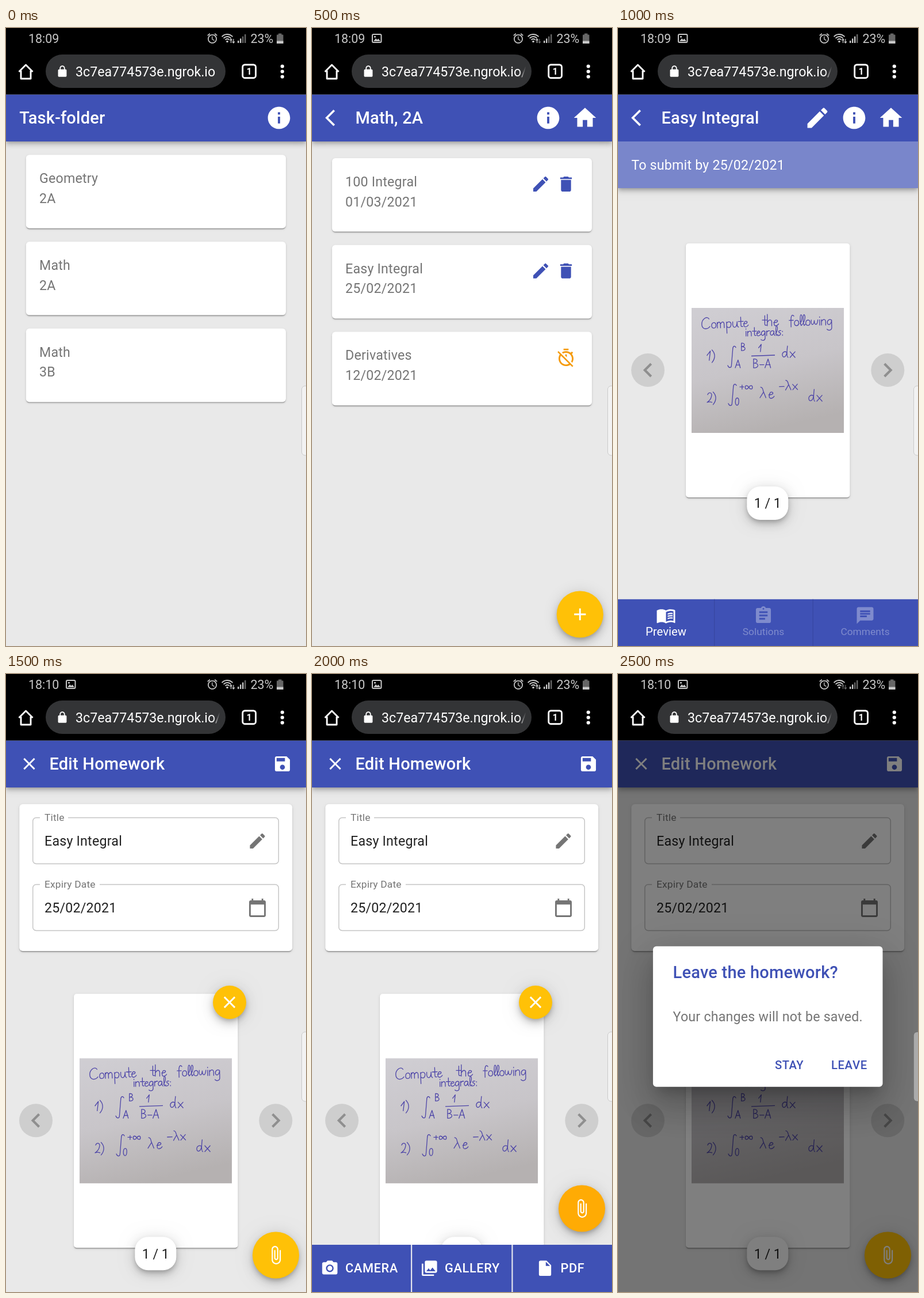
Animation of 522 by 1073 pixels, one loop 3 s. Source, as an HTML page with a canvas:

```html
<!DOCTYPE html>
<html lang="en">
<head>
<meta charset="utf-8">
<title>Homework app</title>
<style>
html, body { margin: 0; width: 100%; height: 100%; overflow: hidden; background: #e9e9e9; }
canvas { display: block; }
</style>
</head>
<body>
<canvas id="stage" width="522" height="1073"></canvas>
<script>
const ctx = document.getElementById('stage').getContext('2d');
const U = 1.45; // stage pixels per layout pixel
const BLUE = '#3f51b5', AMBER = '#ffc107', GREY = '#757575', DARK = '#212121', WHITE = '#fff';

const icons = {
  info: 'M12 2C6.48 2 2 6.48 2 12s4.48 10 10 10 10-4.48 10-10S17.52 2 12 2zm1 15h-2v-6h2v6zm0-8h-2V7h2v2z',
  home: 'M10 20v-6h4v6h5v-8h3L12 3 2 12h3v8z',
  back: 'M11.67 3.87L9.9 2.1 0 12l9.9 9.9 1.77-1.77L3.54 12z',
  prev: 'M15.41 7.41L14 6l-6 6 6 6 1.41-1.41L10.83 12z',
  next: 'M10 6L8.59 7.41 13.17 12l-4.58 4.59L10 18l6-6z',
  edit: 'M3 17.25V21h3.75L17.81 9.94l-3.75-3.75L3 17.25zM20.71 7.04c.39-.39.39-1.02 0-1.41l-2.34-2.34c-.39-.39-1.02-.39-1.41 0l-1.83 1.83 3.75 3.75 1.83-1.83z',
  trash: 'M6 19c0 1.1.9 2 2 2h8c1.1 0 2-.9 2-2V7H6v12zM19 4h-3.5l-1-1h-5l-1 1H5v2h14V4z',
  timerOff: 'M19.04 4.55l-1.42 1.42C16.07 4.74 14.12 4 12 4c-1.83 0-3.53.55-4.95 1.48l1.46 1.46C9.53 6.35 10.73 6 12 6c3.87 0 7 3.13 7 7 0 1.27-.35 2.47-.94 3.49l1.45 1.45C20.45 16.53 21 14.83 21 13c0-2.12-.74-4.07-1.97-5.61l1.42-1.42-1.41-1.42zM15 1H9v2h6V1zm-4 8.44l2 2V8h-2v1.44zM3.02 4L1.75 5.27 4.5 8.03C3.55 9.45 3 11.16 3 13c0 4.97 4.02 9 9 9 1.84 0 3.55-.55 4.98-1.5l2.5 2.5 1.27-1.27-7.71-7.71L3.02 4zM12 20c-3.87 0-7-3.13-7-7 0-1.28.35-2.48.95-3.52l9.56 9.56c-1.03.61-2.23.96-3.51.96z',
  plus: 'M19 13h-6v6h-2v-6H5v-2h6V5h2v6h6v2z',
  close: 'M19 6.41L17.59 5 12 10.59 6.41 5 5 6.41 10.59 12 5 17.59 6.41 19 12 13.41 17.59 19 19 17.59 13.41 12z',
  save: 'M17 3H5c-1.11 0-2 .9-2 2v14c0 1.1.89 2 2 2h14c1.1 0 2-.9 2-2V7l-4-4zm-5 16c-1.66 0-3-1.34-3-3s1.34-3 3-3 3 1.34 3 3-1.34 3-3 3zm3-10H5V5h10v4z',
  date: 'M20 3h-1V1h-2v2H7V1H5v2H4c-1.1 0-2 .9-2 2v16c0 1.1.9 2 2 2h16c1.1 0 2-.9 2-2V5c0-1.1-.9-2-2-2zm0 18H4V8h16v13z',
  clip: 'M16.5 6v11.5c0 2.21-1.79 4-4 4s-4-1.79-4-4V5c0-1.38 1.12-2.5 2.5-2.5s2.5 1.12 2.5 2.5v10.5c0 .55-.45 1-1 1s-1-.45-1-1V6H10v9.5c0 1.38 1.12 2.5 2.5 2.5s2.5-1.12 2.5-2.5V5c0-2.21-1.79-4-4-4S7 2.79 7 5v12.5c0 3.04 2.46 5.5 5.5 5.5s5.5-2.46 5.5-5.5V6h-1.5z',
  book: 'M21 5c-1.11-.35-2.33-.5-3.5-.5-1.95 0-4.05.4-5.5 1.5-1.45-1.1-3.55-1.5-5.5-1.5S2.45 4.9 1 6v14.65c0 .25.25.5.5.5.1 0 .15-.05.25-.05C3.1 20.45 5.05 20 6.5 20c1.95 0 4.05.4 5.5 1.5 1.35-.85 3.8-1.5 5.5-1.5 1.65 0 3.35.3 4.75 1.05.1.05.15.05.25.05.25 0 .5-.25.5-.5V6c-.6-.45-1.25-.75-2-1zm0 13.5c-1.1-.35-2.3-.5-3.5-.5-1.7 0-4.15.65-5.5 1.5V8c1.35-.85 3.8-1.5 5.5-1.5 1.2 0 2.4.15 3.5.5v11.5zM14 9.5q3-1 6-.6v1.5q-3-.5-6 .7zM14 12.2q3-1 6-.6v1.5q-3-.5-6 .7zM14 14.9q3-1 6-.6v1.5q-3-.5-6 .7z',
  tasks: 'M19 3h-4.18C14.4 1.84 13.3 1 12 1c-1.3 0-2.4.84-2.82 2H5c-1.1 0-2 .9-2 2v14c0 1.1.9 2 2 2h14c1.1 0 2-.9 2-2V5c0-1.1-.9-2-2-2zm-7 0c.55 0 1 .45 1 1s-.45 1-1 1-1-.45-1-1 .45-1 1-1zm2 14H7v-2h7v2zm3-4H7v-2h10v2zm0-4H7V7h10v2z',
  chat: 'M20 2H4c-1.1 0-1.99.9-1.99 2L2 22l4-4h14c1.1 0 2-.9 2-2V4c0-1.1-.9-2-2-2zM6 9h12v2H6V9zm8 5H6v-2h8v2zm4-6H6V6h12v2z',
  camera: 'M12 8.8a3.2 3.2 0 1 0 0 6.4 3.2 3.2 0 1 0 0-6.4zM9 2L7.17 4H4c-1.1 0-2 .9-2 2v12c0 1.1.9 2 2 2h16c1.1 0 2-.9 2-2V6c0-1.1-.9-2-2-2h-3.17L15 2H9zm3 15c-2.76 0-5-2.24-5-5s2.24-5 5-5 5 2.24 5 5-2.24 5-5 5z',
  gallery: 'M22 16V4c0-1.1-.9-2-2-2H8c-1.1 0-2 .9-2 2v12c0 1.1.9 2 2 2h12c1.1 0 2-.9 2-2zm-11-4l2.03 2.71L16 11l4 5H8l3-4zM2 6v14c0 1.1.9 2 2 2h14v-2H4V6H2z',
  file: 'M6 2c-1.1 0-1.99.9-1.99 2L4 20c0 1.1.89 2 1.99 2H18c1.1 0 2-.9 2-2V8l-6-6H6zm7 7V3.5L18.5 9H13z',
  alarm: 'M22 5.72l-4.6-3.86-1.29 1.53 4.6 3.86L22 5.72zM7.88 3.39L6.6 1.86 2 5.71l1.29 1.53 4.59-3.85zM12.5 8H11v6l4.75 2.85.75-1.23-4-2.37V8zM12 4c-4.97 0-9 4.03-9 9s4.02 9 9 9c4.97 0 9-4.03 9-9s-4.03-9-9-9zm0 16c-3.87 0-7-3.13-7-7s3.13-7 7-7 7 3.13 7 7-3.13 7-7 7z',
  lock: 'M18 8h-1V6c0-2.76-2.24-5-5-5S7 3.24 7 6v2H6c-1.1 0-2 .9-2 2v10c0 1.1.9 2 2 2h12c1.1 0 2-.9 2-2V10c0-1.1-.9-2-2-2zM15.1 8H8.9V6c0-1.71 1.39-3.1 3.1-3.1 1.71 0 3.1 1.39 3.1 3.1v2z'
};

// Pen strokes: advance, then path on a baseline at y = 0
const pen = {
  C: [16, 'M13-15C10-21 1-15 1-7S9 3 14-3'], o: [9, 'M5-9C0-9-1 0 4 0S9-8 5-9'],
  m: [15, 'M1-9V0M1-6C3-11 6-10 6-5V0M6-6C9-11 12-10 12-5V0'], p: [10, 'M1-9V9M1-7C4-11 9-9 8-4S3 1 1-2'],
  u: [10, 'M1-9C0-2 2 0 4 0S8-4 8-9V-2L10 0'], t: [7, 'M4-16V-3Q4 0 7-1M0-9H8'],
  e: [9, 'M1-5C9-5 8-9 5-9S0 0 4 0Q7 0 9-3'], h: [10, 'M1-18V0M1-5C4-11 8-10 8-5V0'],
  f: [8, 'M8-16C5-20 3-16 3-10V2M0-9H7'], l: [5, 'M1-3C6-10 5-18 3-18S1-3 3 0L5-2'],
  w: [13, 'M1-9C0 1 5 1 6-8C6 1 11 1 12-9'], i: [4, 'M2-9V0M2-14v1'],
  n: [10, 'M1-9V0M1-6C4-11 8-10 8-5V0'], g: [10, 'M8-8C4-11 0-7 1-3S7 0 8-8V4C8 9 3 10 0 7'],
  r: [7, 'M1-9V0M1-6Q3-10 7-9'], a: [10, 'M8-8C4-11 0-7 1-3S7 0 8-8Q7-1 10 0'],
  s: [7, 'M6-9C1-10 1-6 4-5S5 1 0 0'], ':': [4, 'M2-8v1M2-1v1'],
  1: [9, 'M1-9L7-17L5 0'], 2: [10, 'M1-14C3-20 10-18 8-11C7-6 3-2 0 0Q5-2 9 0'],
  0: [10, 'M5-17C-1-17-1 0 4 0S10-16 5-17'], ')': [8, 'M1-19C8-12 7-3 1 4'],
  A: [13, 'M0 0L6-17L11 0M2-6H10'], B: [13, 'M1-17V0M1-17C10-18 10-10 2-9C13-9 11 1 1 0'],
  d: [12, 'M8-8C4-11 0-7 1-3S7 0 8-8M9-18Q7-1 10 0'], x: [11, 'M1-9L9 0M9-9L1 0'],
  'λ': [11, 'M1-16Q4-16 5-10L9 0M5-8L0 0'], '∞': [18, 'M9-4C6-9 1-9 1-4S6 1 9-4S17-9 17-4S12 1 9-4'],
  '+': [11, 'M0-5H9M5-9V0'], '-': [10, 'M0-6H8'], '∫': [14, 'M13-17C11-21 8-19 8-14L6 11C6 16 2 17 0 12']
};

// Shadow layers: offset, blur, spread, opacity
const low = [[2, 1, -1, .2], [1, 1, 0, .14], [1, 3, 0, .12]];
const bar = [[2, 4, -1, .2], [4, 5, 0, .14], [1, 10, 0, .12]];
const float = [[3, 5, -1, .2], [6, 10, 0, .14], [1, 18, 0, .12]];
const high = [[11, 15, -7, .2], [24, 38, 3, .14], [9, 46, 8, .12]];

function rect(x, y, w, h, color) {
  ctx.fillStyle = color;
  ctx.fillRect(x, y, w, h);
}

function round(x, y, w, h, r) {
  ctx.beginPath();
  ctx.roundRect(x, y, w, h, r);
}

function box(x, y, w, h, r, color, layers = []) {
  for (const [dy, blur, spread, alpha] of layers) {
    const s = spread * U;
    ctx.save();
    ctx.shadowColor = `rgba(0,0,0,${alpha})`;
    ctx.shadowBlur = blur * U;
    ctx.shadowOffsetX = 2000;
    ctx.shadowOffsetY = dy * U;
    ctx.fillStyle = '#000';
    round(x - s - 2000, y - s, w + 2 * s, h + 2 * s, Math.max(0, r + s));
    ctx.fill();
    ctx.restore();
  }
  ctx.fillStyle = color;
  round(x, y, w, h, r);
  ctx.fill();
}

function disc(x, y, r, color, layers) {
  box(x - r, y - r, 2 * r, 2 * r, r, color, layers);
}

function icon(name, x, y, color, scale = U) {
  ctx.save();
  ctx.translate(x - 12 * scale, y - 12 * scale);
  ctx.scale(scale, scale);
  ctx.fillStyle = color;
  ctx.fill(new Path2D(icons[name]));
  ctx.restore();
}

// y is the middle of the capital letters
function text(s, x, y, color, size = 16, { weight = 400, space = .0094, align = 'left' } = {}) {
  const px = size * U;
  ctx.font = `${weight} ${px}px Roboto, sans-serif`;
  ctx.letterSpacing = space * px + 'px';
  ctx.textAlign = align;
  ctx.fillStyle = color;
  ctx.fillText(s, x, y + px * .3555);
}

function line(path, color, width) {
  ctx.strokeStyle = color;
  ctx.lineWidth = width;
  ctx.stroke(new Path2D(path));
}

function write(s, x, y, scale, tilt = 0) {
  ctx.save();
  ctx.translate(x, y);
  ctx.rotate(tilt);
  ctx.scale(scale, scale);
  ctx.lineCap = ctx.lineJoin = 'round';
  for (const c of s) {
    line(pen[c][1], '#4d45a8', 1.3 / scale);
    ctx.translate(pen[c][0], 0);
  }
  ctx.restore();
}

function phoneBar(n) {
  const tint = '#c8c8c8', dim = '#666';
  rect(0, 0, 522, 115.5, '#000');
  text(n < 3 ? '18:09' : '18:10', 39, 18.5, tint, 14.8, { space: 0 });
  if (n) {
    ctx.strokeStyle = tint;
    ctx.lineWidth = 2;
    round(105, 11, 15.5, 14, 2);
    ctx.stroke();
    ctx.fillStyle = tint;
    ctx.fill(new Path2D('M107 23l4-5 2.5 2.5 2-2 3.5 4.5zM108 14h3v2.5h-3z'));
  }
  icon('alarm', 359, 18, tint, .88);
  for (const r of [4.5, 8.5, 12.5]) {
    ctx.beginPath();
    ctx.arc(385, 23.5, r, -Math.PI * .77, -Math.PI * .23);
    ctx.strokeStyle = tint;
    ctx.lineWidth = 1.9;
    ctx.stroke();
  }
  disc(385, 23.5, 1.8, tint);
  line('M391.5 26v-7m-2 2.5l2-2.5 2 2.5', n === 5 ? dim : tint, 1.3);
  line('M395.8 19v7m-2-2.5l2 2.5 2-2.5', n === 1 || n === 5 ? dim : tint, 1.3);
  const strong = n > 1 && n < 5 ? 3 : 2;
  for (let i = 0; i < 4; i++) {
    const h = 4 + i * 3.7;
    rect(403 + i * 4, 26 - h, 2.4, h, i < strong ? tint : dim);
  }
  text('23%', 425.5, 18.5, tint, 14.8, { space: 0 });
  rect(474, 9.5, 5.5, 3, dim);
  box(471, 11.5, 11.5, 15.5, 1, dim);
  rect(471, 22.5, 11.5, 4.5, tint);

  ctx.lineJoin = 'round';
  line('M22.5 76L34.5 64L46.5 76M26 74V88H43V74', WHITE, 2.9);
  ctx.lineJoin = 'miter';
  box(69, 46, 313, 58, 29, '#333436');
  icon('lock', 98, 75.5, WHITE, .93);
  text('3c7ea774573e.ngrok.io' + (n ? '/' : ''), 121, 76, WHITE, 16, { space: 0 });
  if (n) {
    const fade = ctx.createLinearGradient(360, 0, 372, 0);
    fade.addColorStop(0, '#33343600');
    fade.addColorStop(1, '#333436');
    rect(360, 60, 14, 32, fade);
  }
  ctx.strokeStyle = WHITE;
  ctx.lineWidth = 2.9;
  round(411.7, 63.7, 22.8, 23, 4);
  ctx.stroke();
  text('1', 423, 75.3, WHITE, 11, { weight: 700, space: 0, align: 'center' });
  for (const y of [66.5, 75.5, 84.5]) disc(480.8, y, 3.1, WHITE);
}

function appBar(title, x, lead, tail) {
  box(0, 115.5, 522, 81.5, 0, BLUE, bar);
  if (lead === 'back') icon('back', 40.4, 156, WHITE);
  if (lead === 'close') icon('close', 40.4, 156, WHITE);
  text(title, x, 156, WHITE, 20, { weight: 500, space: .0075 });
  tail.forEach((name, i) => icon(name, 475 - i * 64, 156, WHITE, 1.933));
}

function cards(top, rows) {
  rows.forEach(([a, b, ...tools], i) => {
    const y = top + i * 150.8;
    box(34.8, y, 452.2, 127.6, 5.8, WHITE, low);
    text(a, 58, y + 40.6, GREY);
    text(b, 58, y + 75.4, GREY);
    tools.forEach((t, k) => icon(t, 442 - k * 44, y + 45, t === 'timerOff' ? '#f59b0c' : BLUE));
  });
}

function sheet(y) {
  box(118, y, 285.5, 441, 5, WHITE, low);
  const paper = ctx.createLinearGradient(190, y + 112, 240, y + 329);
  paper.addColorStop(0, '#cfcdd2');
  paper.addColorStop(.5, '#c8c5c9');
  paper.addColorStop(1, '#b5b1b1');
  rect(128, y + 112, 265, 217, paper);

  ctx.save();
  ctx.translate(0, y - 374);
  write('Compute', 145, 522, 1.08, -.04);
  write('the', 251, 517, 1.1);
  write('following', 298, 517, 1.04, -.02);
  write('integrals:', 221, 535, .92, -.02);
  write('1)', 154, 577, .95);
  write('∫', 191, 573, 1.08);
  write('B', 214, 560, .75);
  write('A', 204, 590, .8);
  write('1', 244, 562, .75);
  line('M232 569.5L273 568', '#4d45a8', 1.3);
  write('B-A', 235, 590, .9);
  write('dx', 285, 572, 1.1);
  write('2)', 155, 650, .95);
  write('∫', 192, 639, 1.08);
  write('0', 204, 655, .75);
  write('+∞', 212, 627, .78);
  write('λ', 247, 642, 1.15);
  write('e', 261, 643, 1.2);
  write('-λx', 281, 629, 1.05, -.04);
  write('dx', 331, 648, 1.15);
  ctx.restore();

  disc(52, y + 220, 29, '#cecece');
  icon('prev', 52, y + 220, '#8f8f8f', 2.08);
  disc(469.3, y + 220, 29, '#cecece');
  icon('next', 469.3, y + 220, '#8f8f8f', 2.08);
  box(224.3, y + 422, 72, 58, 23, WHITE, float);
  text('1 / 1', 260.3, y + 451, DARK, 16, { space: 0, align: 'center' });
}

function fab(x, y, name, r = 40.6, color = AMBER) {
  disc(x, y, r, color, float);
  icon(name, x, y, WHITE);
}

function field(y, label, notch, value, tool) {
  ctx.strokeStyle = '#c4c4c4';
  ctx.lineWidth = U;
  round(46.7, y, 427.6, 80, 5.8);
  ctx.stroke();
  rect(59, y - 2, notch - 59, 4, WHITE);
  text(label, 67, y - .3, GREY, 12);
  text(value, 67, y + 40.5, DARK);
  icon(tool, 437.5, y + 40.5, GREY);
}

function editor(clipY, color) {
  sheet(555.3);
  box(23.2, 226, 475, 255, 5.8, WHITE, low);
  field(249.5, 'Title', 108, 'Easy Integral', 'edit');
  field(365.5, 'Expiry Date', 163, '25/02/2021', 'date');
  fab(389, 570, 'close', 29);
  appBar('Edit Homework', 75.4, 'close', []);
  icon('save', 481, 156, WHITE);
  fab(469.5, clipY, 'clip', 40.6, color);
}

function tabs() {
  const soft = '#7f8bcd';
  rect(0, 991.8, 522, 82, BLUE);
  rect(167, 991.8, 1.4, 82, '#3848a3');
  rect(338.5, 991.8, 1.4, 82, '#3848a3');
  [['book', 'Preview', 83.5], ['tasks', 'Solutions', 253], ['chat', 'Comments', 430]].forEach(([pic, name, x], i) => {
    icon(pic, x, 1020, i ? soft : WHITE);
    text(name, x, 1048, i ? soft : WHITE, i ? 12 : 14, { space: 0, align: 'center' });
  });
}

function sources() {
  rect(0, 991, 522, 82, BLUE);
  rect(172, 991, 2.2, 82, '#e4e5ee');
  rect(347.3, 991, 2.2, 82, '#e4e5ee');
  [['camera', 31, 'CAMERA', 58], ['gallery', 204.3, 'GALLERY', 231], ['file', 405.5, 'PDF', 432.5]].forEach(([pic, ix, name, x]) => {
    icon(pic, ix, 1031.8, WHITE, 1.33);
    text(name, x, 1031.5, WHITE, 15, { weight: 500, space: .0286 });
  });
}

function dialog() {
  rect(0, 115.5, 522, 958, 'rgba(0,0,0,.5)');
  box(60.9, 472.8, 399.6, 244, 5.8, WHITE, high);
  text('Leave the homework?', 95.5, 518, BLUE, 20, { weight: 500, space: .0075 });
  text('Your changes will not be saved.', 95.5, 594.5, GREY);
  text('STAY', 273, 678.5, BLUE, 14, { weight: 500, space: .0286 });
  text('LEAVE', 371, 678.5, BLUE, 14, { weight: 500, space: .0286 });
}

function edgeHandle() {
  box(514.5, 621.5, 20, 120.5, 6, 'rgba(255,255,255,.4)');
  ctx.strokeStyle = 'rgba(0,0,0,.14)';
  ctx.lineWidth = 1;
  ctx.stroke();
}

const scenes = [
  () => {
    cards(220.2, [['Geometry', '2A'], ['Math', '2A'], ['Math', '3B']]);
    appBar('Task-folder', 23.2, '', ['info']);
  },
  () => {
    cards(226, [
      ['100 Integral', '01/03/2021', 'trash', 'edit'],
      ['Easy Integral', '25/02/2021', 'trash', 'edit'],
      ['Derivatives', '12/02/2021', 'timerOff']
    ]);
    appBar('Math, 2A', 75.4, 'back', ['home', 'info']);
    fab(466.3, 1018, 'plus');
  },
  () => {
    sheet(374);
    box(0, 197, 522, 81, 0, '#7986cb', bar);
    text('To submit by 25/02/2021', 23.2, 238, WHITE);
    ctx.save();
    ctx.beginPath();
    ctx.rect(0, 0, 522, 197);
    ctx.clip();
    appBar('Easy Integral', 75.4, 'back', ['home', 'info', 'edit']);
    ctx.restore();
    tabs();
  },
  () => editor(1009, AMBER),
  () => { editor(928, '#ffab04'); sources(); },
  () => { editor(1009, AMBER); dialog(); }
];

const STEP = 500;
const start = performance.now();
let shown = -1;

function tick() {
  const n = Math.floor(Math.max(0, performance.now() - start) / STEP) % scenes.length;
  if (n !== shown) {
    shown = n;
    rect(0, 0, 522, 1073, '#e9e9e9');
    scenes[n]();
    phoneBar(n);
    edgeHandle();
  }
  requestAnimationFrame(tick);
}
tick();
</script>
</body>
</html>
```
